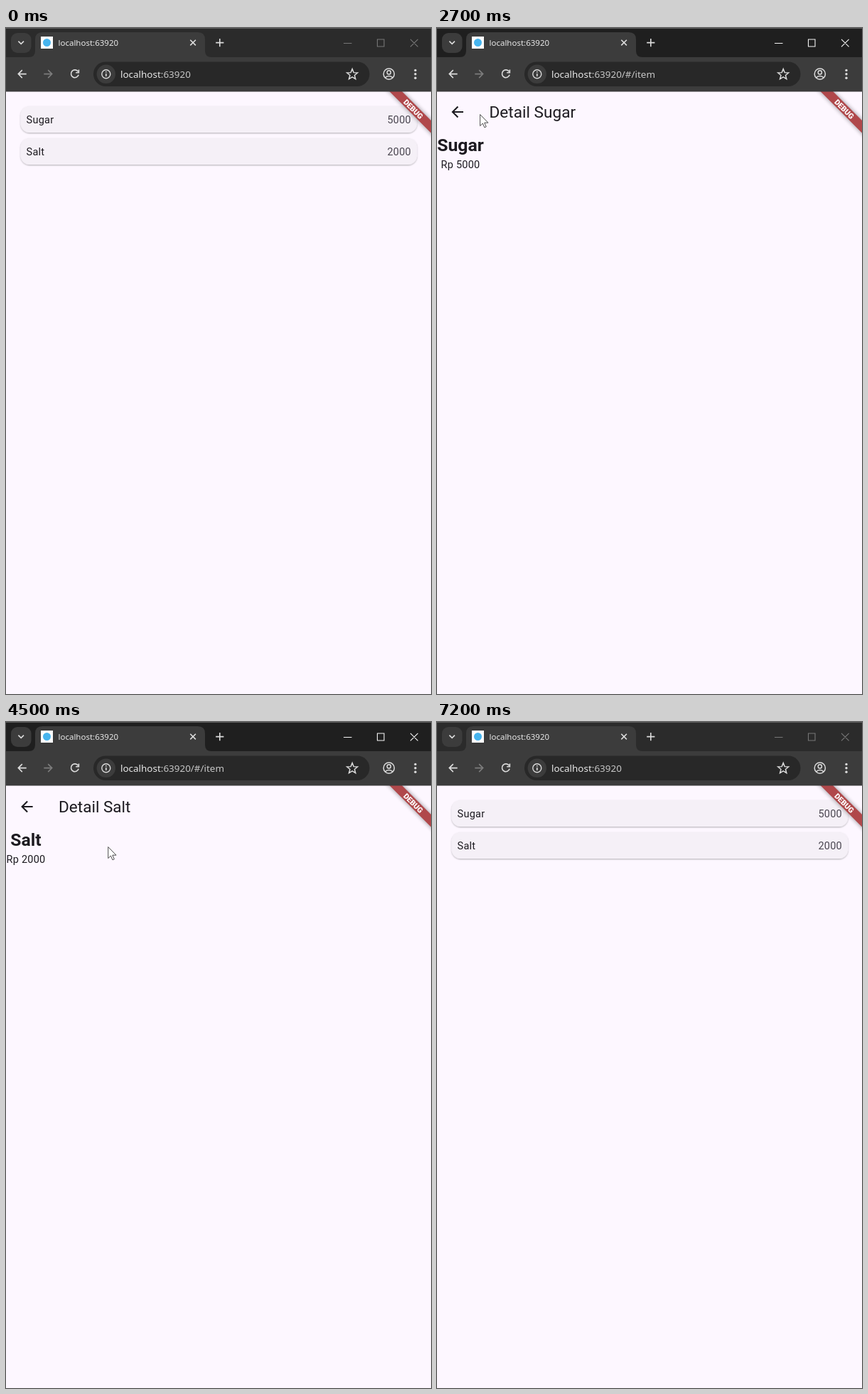
An HTML page for the animation above (8000 ms loop, 598 by 936 pixels).

```html
<!DOCTYPE html>
<html lang="en">
<head>
<meta charset="utf-8">
<title>Item list</title>
<style>
  html, body { margin: 0; width: 100%; height: 100%; overflow: hidden; background: #fdf7ff; }
  svg { display: block; width: 598px; height: 936px; }
  .app { font-family: Roboto, sans-serif; font-size: 14.5px; letter-spacing: .25px; fill: #1d1b20; }
  .price { fill: #49454f; text-anchor: end; }
  .bar { font-family: "Noto Sans", "Open Sans", sans-serif; font-size: 11.5px; fill: #e8e8e8; }
  .line { fill: none; stroke: #dcdcdc; stroke-width: 1.6; }
</style>
</head>
<body>
<svg viewBox="0 0 598 936">
  <defs>
    <filter id="lift" x="-5%" y="-20%" width="110%" height="150%">
      <feDropShadow dx="0" dy="1" stdDeviation=".9" flood-color="#000" flood-opacity=".3"/>
    </filter>
    <filter id="glow" x="-20%" y="-80%" width="140%" height="260%">
      <feGaussianBlur stdDeviation="3"/>
    </filter>
    <clipPath id="cell0"><rect x="16.5" y="106" width="565.5" height="45"/></clipPath>
    <clipPath id="cell1"><rect x="16.5" y="151" width="565.5" height="45"/></clipPath>
    <clipPath id="view"><rect y="89" width="598" height="847"/></clipPath>
  </defs>
  <rect width="598" height="936" fill="#fdf7ff"/>

  <g class="app" clip-path="url(#view)">
    <g id="list"></g>
    <g id="detail">
      <rect y="89" width="598" height="847" fill="#fdf7ff"/>
      <circle id="halo" cx="28.6" cy="118" r="20.6" fill="#1d1b20" fill-opacity=".09"/>
      <path transform="translate(16.3 105.6) scale(1.035)" d="M20 11H7.83l5.59-5.59L12 4l-8 8 8 8 1.41-1.41L7.83 13H20z"/>
      <text id="title" x="73.5" y="126" font-size="22.6" letter-spacing="0"></text>
      <text id="name" y="173" font-size="24.8" font-weight="700" letter-spacing="0" text-anchor="middle"></text>
      <text id="cost" y="197" text-anchor="middle"></text>
    </g>
    <g id="tip">
      <rect x="10" y="142.5" width="45" height="26.5" rx="4" fill="#616161" fill-opacity=".92"/>
      <text x="32.6" y="160.2" font-size="12.3" font-weight="500" fill="#fff" text-anchor="middle">Back</text>
    </g>
    <g transform="translate(598 89) rotate(45) scale(1.035)">
      <rect x="-50" y="28" width="100" height="12" fill="#000" opacity=".42" filter="url(#glow)"/>
      <rect x="-50" y="28" width="100" height="12" fill="#b0484b"/>
      <text y="37.7" font-size="10.2" font-weight="900" letter-spacing="0" fill="#fff" text-anchor="middle">DEBUG</text>
    </g>
  </g>

  <g class="bar">
    <rect id="frame" width="598" height="42"/>
    <rect width="598" height="1" fill="#5a5a5a"/>
    <rect y="41" width="598" height="48.5" fill="#3c3c3c"/>
    <path fill="#3c3c3c" d="M32 41q9 0 9-9V16q0-10 10-10h219q10 0 10 10v16q0 9 9 9z"/>
    <rect x="7" y="7" width="28.5" height="28" rx="9" fill="#3c3c3c"/>
    <path class="line" d="M17.4 18.6l3.8 3.7 3.8-3.7"/>
    <rect x="49" y="12" width="17" height="17" fill="#fff"/>
    <circle cx="57.5" cy="20.5" r="5.5" fill="#46b4ee"/>
    <text x="73.5" y="25">localhost:63920</text>
    <path class="line" d="M259.3 16.8l7.6 7.6m0-7.6l-7.6 7.6M295.2 20.6h11.2m-5.6-5.6v11.2"/>
    <g id="controls" fill="none" stroke-width="1.1">
      <path d="M475 21.5h11.5M522.5 16h9.5v10h-9.5zM569 15.8l10.6 10.6m0-10.6L569 26.4"/>
    </g>
    <path class="line" d="M28.7 64.6H17.4m5.4-5.5l-5.5 5.5 5.5 5.5"/>
    <path class="line" style="stroke:#7c7c7c" d="M53.3 64.6h11.3m-5.4-5.5l5.5 5.5-5.5 5.5"/>
    <path class="line" d="M101.4 61.3a5.4 5.4 0 1 0 .7 4.5M102.4 58.6v4.2h-4.2"/>
    <rect x="123" y="47.5" width="388.5" height="34.5" rx="17.2" fill="#282828"/>
    <circle cx="140.8" cy="64.8" r="13.2" fill="#3c3c3c"/>
    <circle class="line" cx="140.8" cy="64.8" r="6" style="stroke-width:1.4"/>
    <path class="line" d="M140.8 64v4m0-7v1.6"/>
    <text x="161" y="70" font-size="13.45">localhost<tspan fill="#c7c7c7">:63920<tspan id="path"></tspan></tspan></text>
    <path id="star" class="line" style="stroke-width:1.5"/>
    <g class="line" style="stroke-width:1.5">
      <circle cx="538.8" cy="64.7" r="7.6"/>
      <circle cx="538.8" cy="62.4" r="2.6"/>
      <path d="M533.4 70q2.2-2.5 5.4-2.5t5.4 2.5"/>
    </g>
    <g fill="#dcdcdc">
      <circle cx="576" cy="59.4" r="1.7"/><circle cx="576" cy="64.8" r="1.7"/><circle cx="576" cy="70.2" r="1.7"/>
    </g>
  </g>

  <g id="cursor" fill="#fff" stroke="#3a3a3a" stroke-linejoin="round">
    <path id="hand" stroke-width=".9" d="M-1.6 1.2q0-1.4 1.3-1.4t1.3 1.4v5q2-.6 2.3.7q1.8-.6 2.2.6q1.9-.5 2.1 1v2.9q0 2.2-1.6 4.4H.2q-1.6-2.4-4-5.2q-1.4-1.8-.2-2.5q1.2-.5 2.4 1.4z"/>
    <path id="arrow" stroke-width=".9" d="M0 0v16l3.7-3.5 2.5 5.7 2.4-1-2.5-5.6h5.2z"/>
  </g>
</svg>

<script>
const $ = id => document.getElementById(id);
const set = (id, attrs) => { for (const k in attrs) $(id).setAttribute(k, attrs[k]); };
const clamp = v => Math.min(1, Math.max(0, v));
const LOOP = 8000, STEP = 100, MOVE = 300;

const items = [
  { name: 'Sugar', price: 5000, mid: 33 },
  { name: 'Salt', price: 2000, mid: 27.3 }
];
// One visit per item: press, page opens, tooltip starts, page closes.
const visits = [
  { item: 0, press: 2000, open: 2100, tip: 2900, close: 3300, x: 191, y: 135 },
  { item: 1, press: 4200, open: 4300, tip: 5100, close: 5600, x: 160, y: 180 }
];
// Pointer tip: time, x, y
const route = [
  [1200, 72, 420], [2000, 184.6, 136], [2200, 184.6, 136], [2900, 30, 118],
  [3300, 30, 118], [3400, 37, 118], [4000, 153, 180], [4400, 153, 180],
  [5000, 28, 120], [5300, 29.5, 122], [5600, 29.5, 122], [6000, 30, 121],
  [6100, 30, 121], [6400, 12, 405]
];

$('list').innerHTML = items.map((it, i) => {
  const y = 45 * i;
  return `<rect id="hover${i}" x="16.5" y="${106 + y}" width="565.5" height="45" fill="#000"/>
    <circle id="ripple${i}" fill="#000" fill-opacity=".06" clip-path="url(#cell${i})"/>
    <rect x="20.7" y="${110 + y}" width="557.5" height="37" rx="12.4" fill="#f5f0f7" filter="url(#lift)"/>
    <text x="28.6" y="${134 + y}">${it.name}</text>
    <text class="price" x="570" y="${134 + y}">${it.price}</text>`;
}).join('');

set('star', { d: 'M' + Array.from({ length: 10 }, (_, i) => {
  const r = i % 2 ? 3.4 : 7.8, a = i * Math.PI / 5;
  return `${(487.2 + r * Math.sin(a)).toFixed(2)} ${(65.4 - r * Math.cos(a)).toFixed(2)}`;
}).join('L') + 'z' });

const glide = p => 1 - Math.pow(1 - p, 3.74);
const zoom = s => `translate(299 512.5) scale(${s}) translate(-299 -512.5)`;

function pointer(t) {
  const i = route.findIndex(k => k[0] > t);
  if (i === 0 || t > 6400) return null;
  if (i < 0) return route[route.length - 1].slice(1);
  const [a, b] = [route[i - 1], route[i]];
  const p = (t - a[0]) / (b[0] - a[0]), e = p * p * (3 - 2 * p);
  return [a[1] + (b[1] - a[1]) * e, a[2] + (b[2] - a[2]) * e];
}

function draw(t) {
  const active = t >= 800 && t < 7200;
  set('frame', { fill: active ? '#1f1f1f' : '#2b2b2b' });
  set('controls', { stroke: active ? '#f4f4f4' : '#777' });

  const v = t < 4100 ? visits[0] : visits[1], it = items[v.item];
  const inP = clamp((t - v.open) / MOVE), outP = clamp((t - v.close) / MOVE);
  const closing = t >= v.close;
  const alpha = closing ? 1 - clamp((outP - .0825) / .125) : clamp((inP - .125) / .125);
  const shown = alpha > 0;
  $('path').textContent = t >= v.open && !closing ? '/#/item' : '';
  set('list', { transform: zoom(closing ? 1.1 - .1 * glide(outP) : 1 + .05 * glide(inP)) });
  set('detail', {
    opacity: alpha,
    transform: zoom(closing ? 1 - .1 * glide(outP) : .85 + .15 * glide(inP))
  });
  $('title').textContent = 'Detail ' + it.name;
  $('name').textContent = it.name;
  $('cost').textContent = 'Rp ' + it.price;
  set('name', { x: it.mid });
  set('cost', { x: it.mid });

  const at = pointer(t), [x, y] = at || [-99, -99];
  const onBack = shown && Math.hypot(x - 28.6, y - 118) < 20.6;
  const row = !shown && x > 16 && x < 582 && y > 106 && y < 196 ? (y < 151 ? 0 : 1) : -1;
  set('halo', { opacity: +onBack });
  set('tip', { opacity: closing ? alpha : clamp((t - v.tip) / 200) });

  items.forEach((_, i) => {
    const pressed = i === v.item && t >= v.press && t < v.open + STEP;
    const grow = (t - v.press) / STEP;
    set('hover' + i, { opacity: pressed && grow >= 1 ? .08 : i === row ? .04 : 0 });
    set('ripple' + i, {
      cx: v.x, cy: v.y, r: pressed ? 85 + 11 * grow : 0, opacity: clamp(grow)
    });
  });

  const hand = row >= 0 || onBack;
  set('cursor', { transform: `translate(${x} ${y})`, opacity: at ? 1 : 0 });
  set('hand', { opacity: +hand });
  set('arrow', { opacity: +!hand });
}

const start = performance.now();
function tick() {
  const t = (performance.now() - start) % LOOP;
  draw(Math.floor(t / STEP) * STEP);
  requestAnimationFrame(tick);
}
tick();
</script>
</body>
</html>
```
